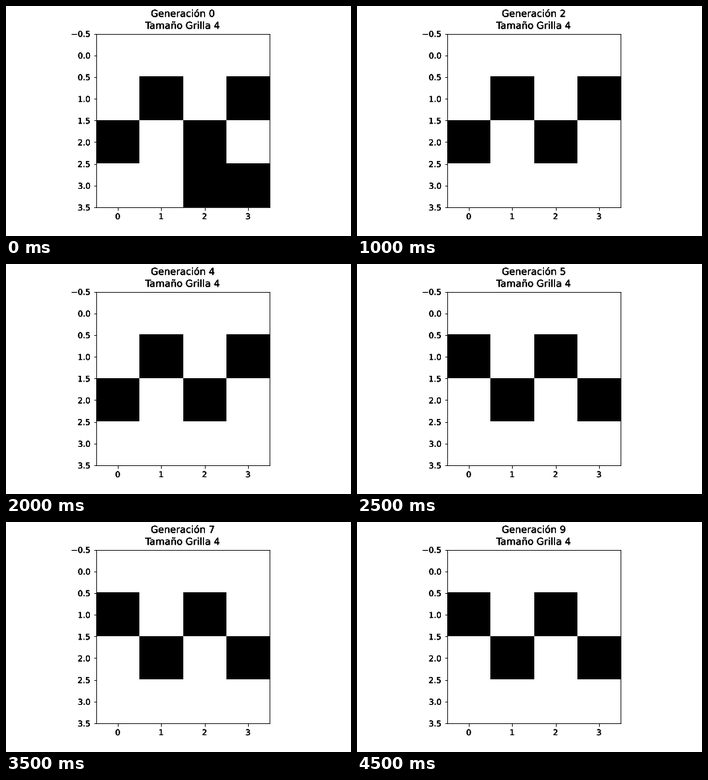
Recreate the animation shown at these times as a matplotlib script. Size 432 px wide and 288 px high, loop 5000 ms.

```python
import matplotlib.pyplot as plt
import numpy as np
from matplotlib.animation import FuncAnimation
from matplotlib.patheffects import Normal

SIZE = 4
GENERATIONS = 10
START = [[0, 0, 0, 0],
         [0, 1, 0, 1],
         [1, 0, 1, 0],
         [0, 0, 1, 1]]


def step(grid):
    """Four wrapped neighbours: born with three or more, survive with two."""
    near = sum(np.roll(grid, shift, axis) for shift in (-1, 1) for axis in (0, 1))
    return np.where(grid == 1, near >= 2, near >= 3).astype(int)


history = [np.array(START)]
while len(history) < GENERATIONS:
    history.append(step(history[-1]))

plt.rcParams["font.family"] = "DejaVu Sans"
fig = plt.figure(figsize=(6, 4), dpi=72, facecolor="white")
fig.subplots_adjust(left=0.125, right=0.9, bottom=0.125, top=0.88)
ax = fig.add_subplot()
image = ax.imshow(history[0], cmap="binary", vmin=0, vmax=1,
                  interpolation="nearest")
ax.set_xticks(range(SIZE))
ax.set_yticks(np.arange(-0.5, SIZE, 0.5))
title = ax.set_title("")

# Repeated passes give the text its heavy edges.
for text in [title, *ax.get_xticklabels(), *ax.get_yticklabels()]:
    text.set_path_effects([Normal()] * 3)


def draw(i):
    image.set_data(history[i])
    title.set_text(f"Generación {i}\nTamaño Grilla {SIZE}")
    return image, title


anim = FuncAnimation(fig, draw, frames=GENERATIONS, interval=500,
                     repeat=True, repeat_delay=0)
plt.show()
```
